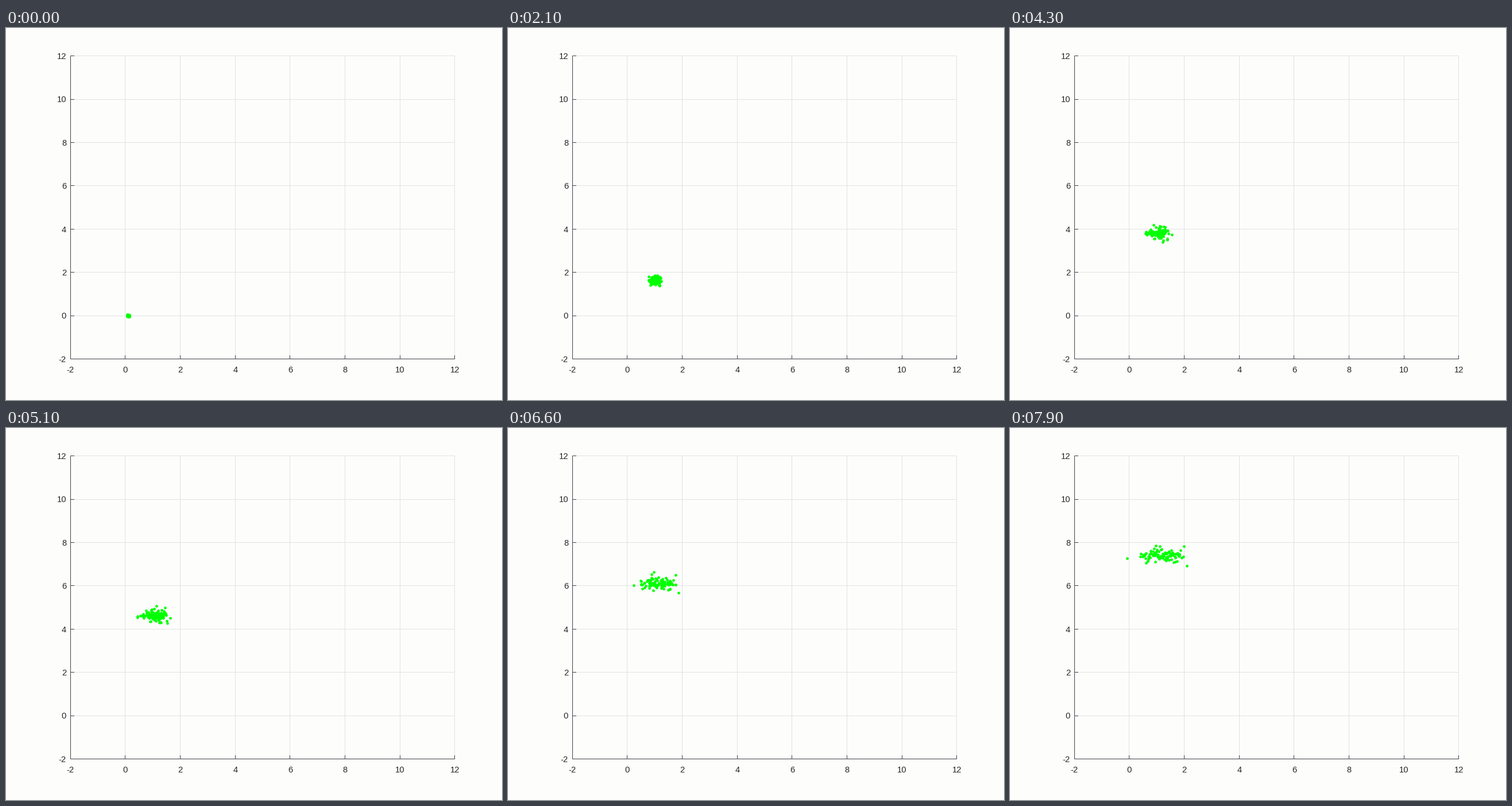
These frames come from a looping animation (864 by 648 pixels, 8000 ms). A matplotlib script:

```python
import numpy as np
import matplotlib.pyplot as plt
from matplotlib.animation import FuncAnimation

W, H, DPI = 864, 648, 100
PT = 72 / DPI
LOW, HIGH = -2, 12
LEFT, RIGHT, TOP, BOTTOM = 0.13 * W, 0.905 * W, 0.075 * H, 0.89 * H
GRID, AXIS, INK = "#e2e2e5", "#433f4a", "#262626"

STEPS, COUNT = 80, 100
STRIDE = 0.1          # distance per step
TURN_BIAS = -0.0006   # slow veer to the right, radians per step
TURN_NOISE = 0.009
MOVE_NOISE = 0.02

plt.rcParams["font.family"] = "Liberation Sans"


def sx(v):
    return LEFT + (RIGHT - LEFT) * (v - LOW) / (HIGH - LOW)


def sy(v):
    return BOTTOM + (TOP - BOTTOM) * (v - LOW) / (HIGH - LOW)


def simulate():
    """Noisy walkers: a quarter circle of radius 1, then straight up."""
    rng = np.random.default_rng(7)

    def noise(scale):
        n = rng.normal(0, scale, (STEPS, COUNT))
        return n - n.mean(axis=1, keepdims=True)

    step = np.arange(STEPS)[:, None]
    turn = np.minimum(STRIDE * (step + 0.5), np.pi / 2)
    heading = turn + TURN_BIAS * step + np.cumsum(noise(TURN_NOISE), axis=0)
    dx = STRIDE * np.cos(heading) + noise(MOVE_NOISE)
    dy = STRIDE * np.sin(heading) + noise(MOVE_NOISE)
    return np.cumsum(dx, axis=0), np.cumsum(dy, axis=0)


fig = plt.figure(figsize=(W / DPI, H / DPI), dpi=DPI, facecolor="#fdfdfc")
ax = fig.add_axes([0, 0, 1, 1])
ax.set_xlim(0, W)
ax.set_ylim(H, 0)
ax.axis("off")


def crisp(v):
    return np.floor(v) + 0.5


def hline(y, x0, x1, color, z):
    ax.plot([x0, x1], [crisp(y)] * 2, color=color, lw=PT, zorder=z,
            solid_capstyle="butt", snap=False)


def vline(x, y0, y1, color, z):
    ax.plot([crisp(x)] * 2, [y0, y1], color=color, lw=PT, zorder=z,
            solid_capstyle="butt", snap=False)


def label(x, y, v, align):
    ax.text(x, y, str(v), size=14.7 * PT, color=INK, ha=align, va="baseline")


for v in range(LOW, HIGH + 1, 2):
    x, y = sx(v), sy(v)
    vline(x, TOP, BOTTOM, GRID, 1)
    hline(y, LEFT, RIGHT, GRID, 1)
    vline(x, BOTTOM, BOTTOM - 6.7, AXIS, 2)
    hline(y, LEFT, LEFT + 6.7, AXIS, 2)
    label(x, 599.5, v, "center")
    label(105, y + 5.2, v, "right")
vline(LEFT, TOP, BOTTOM, AXIS, 2)
hline(BOTTOM, LEFT, RIGHT, AXIS, 2)

xs, ys = simulate()
dots, = ax.plot([], [], "o", color="#00ff00", ms=4.7 * PT, mew=0, zorder=3)


def update(i):
    dots.set_data(sx(xs[i]), sy(ys[i]))
    return dots,


anim = FuncAnimation(fig, update, frames=STEPS, interval=100,
                     repeat=True, repeat_delay=0, blit=False)
plt.show()
```
